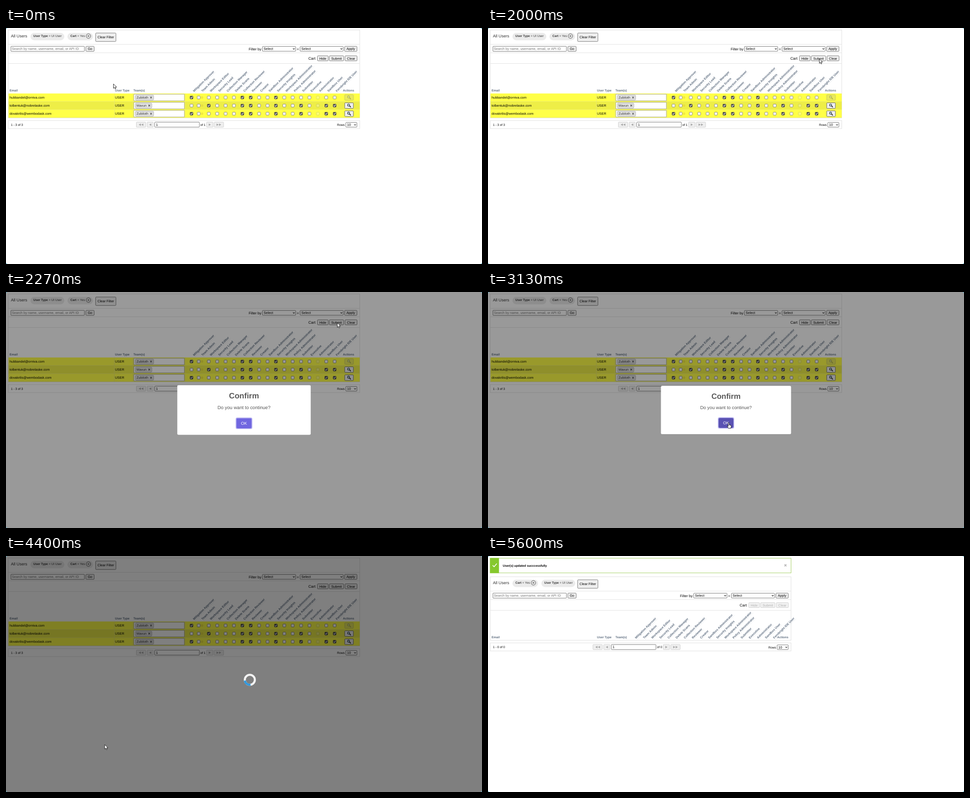
Write an HTML page that moves like this. It is 1061x528 px and loops after 7.39 s.

```html
<!DOCTYPE html>
<html lang="en">
<head>
<meta charset="utf-8">
<title>All Users</title>
<style>
  html, body { margin: 0; width: 100%; height: 100%; overflow: hidden; background: #45b3cf; }
  svg { display: block; width: 100vw; height: 100vh; }
  text { font-family: "Liberation Sans", Arial, sans-serif; text-rendering: geometricPrecision; white-space: pre; }
  .b { font-weight: bold; }
  .m { text-anchor: middle; }
  .head { font-weight: bold; fill: #5f6e80; }
</style>
</head>
<body>
<svg id="stage" viewBox="0 0 1061 528"></svg>
<script>
const LOOP = 7390, TICK = 1000 / 15;
const S = 6.8, M = 7.37, L = 7.56;   // text sizes
const stage = document.getElementById('stage');

const ROLES = ['Mitigation Approver', 'Team Admin', 'Workspace Editor', 'Security Lead', 'Collection Manager',
  'Delete Scans', 'Collection Reviewer', 'Reviewer', 'Creator', 'Sandbox Administrator', 'Security Insights',
  'Workspace Administrator', 'Policy Administrator', 'Submitter', 'Executive', 'Administrator', 'Sandbox User',
  'Fernbright IDE User'];
const USERS = [
  { email: 'hubbandel@orniva.com', team: 'Zubiloth', tag: 41, roles: [0, 6, 7, 10] },
  { email: 'tolbentuk@nobrelaske.com', team: 'Mavun', tag: 37, roles: [2, 6, 7, 10, 13, 16, 17] },
  { email: 'dovakrilis@wembodask.com', team: 'Zubiloth', tag: 41, roles: [0, 6, 7, 10, 13, 16, 17] }
];

// Drawing helpers, each returns SVG markup
const text = (x, y, s, size = L, attrs = '') => `<text x="${x}" y="${y}" font-size="${size}" ${attrs}>${s}</text>`;
const rect = (x, y, w, h, fill, stroke = 'none', r = 0, attrs = '') =>
  `<rect x="${x}" y="${y}" width="${w}" height="${h}" rx="${r}" fill="${fill}" stroke="${stroke}" ${attrs}/>`;
const path = (d, stroke, width = 1, attrs = '') =>
  `<path d="${d}" fill="none" stroke="${stroke}" stroke-width="${width}" ${attrs}/>`;
const group = (x, y, body, attrs = '') => `<g transform="translate(${x} ${y})" ${attrs}>${body}</g>`;
const cross = (x, y, r, color, width) =>
  path(`M${x - r} ${y - r}l${2 * r} ${2 * r}m0 ${-2 * r}l${-2 * r} ${2 * r}`, color, width);
const button = (x, y, w, h, label, off = false, attrs = '') =>
  rect(x, y, w, h, off ? '#f1f1f1' : '#efefef', off ? '#cfcfcf' : '#767676', 1.4, attrs) +
  text(x + w / 2, y + h / 2 + 2.7, label, L, `class="m" fill="${off ? '#b3b3b3' : '#000'}"`);
const select = (x, y, w, h, label) =>
  rect(x, y, w, h, '#fff', '#767676', 1) + text(x + 2.8, y + h / 2 + 2.6, label) +
  path(`M${x + w - 6.2} ${y + h / 2 - 1}l2 2 2-2`, '#222', 1.1);
const chip = (x, w, key, value) =>
  rect(x, 11, w, 16.5, '#ebebeb', 'none', 8.2) +
  text(x + 6.5, 20.4, `<tspan class="b">${key}</tspan> = ${value}`, S, 'fill="#333"');

const cartChip = x => chip(x, 57, 'Cart', 'Yes') +
  `<circle cx="${x + 46.7}" cy="18" r="5.1" fill="none" stroke="#444" stroke-width=".9"/>` +
  cross(x + 46.7, 18, 2, '#333', .9);
const typeChip = x => chip(x, 75.5, 'User Type', 'UI User');

function pagerButton(x, w, dir, count) {
  let arrows = '';
  for (let i = 0; i < count; i++) {
    const cx = x + w / 2 + (i - (count - 1) / 2) * 5.6;
    arrows += `<path d="M${cx + 2.4 * dir} 216.3l${-4.8 * dir} -2.6v5.2z" fill="#a8a8a8"/>`;
  }
  return rect(x, 210.5, w, 11.5, '#efefef', '#d0d0d0', 1.2) + arrows;
}

function checkbox(x, y, on, off) {
  const box = rect(x - 3.3, y - 3.3, 6.6, 6.6, on ? '#4d4d4d' : '#fff', on ? '#4d4d4d' : '#767676', 1.3,
    off ? 'opacity=".25"' : 'stroke-width=".9"');
  return box + (on ? path(`M${x - 2.2} ${y + .1}l1.6 1.7 2.9-3.7`, '#fff', 1.1) : '');
}

function userRow(user, i) {
  const y = 155.5 + 18.1 * i, off = i === 0;
  let s = rect(5.5, y - 9, 783, 18.1, i === 1 ? '#eeee47' : '#ffff47') +
    path(`M5.5 ${y + 9}H788M241.5 ${y - 9}v18M282.5 ${y - 9}v18M399.5 ${y - 9}v18`, '#e6e67a', .8) +
    text(8, y + 2.7, user.email, M) + text(243, y + 2.7, 'USER', M) +
    rect(285, y - 7.3, 112.5, 14.6, '#fff', '#aaa') +
    rect(288.5, y - 5.3, user.tag - .5, 10.8, '#e4e4e4', '#aaa', 1.6) +
    text(291, y + 2.7, user.team, M, 'fill="#333"') +
    cross(282.3 + user.tag, y, 2.1, '#555', 1.2);
  ROLES.forEach((_, c) => {
    const x = c < 2 ? 413.5 + 16 * c : 452 + 18.7 * (c - 2);
    s += checkbox(x, y, user.roles.includes(c), c === 15);
  });
  s += `<circle cx="437" cy="${y}" r="1.8" fill="none" stroke="#dcc838" stroke-width=".9"/>`;
  s += rect(755, y - 6.3, 19.3, 12.6, off ? '#eaea5c' : '#efefef', off ? '#c9c960' : '#666', 1.4);
  s += `<g opacity="${off ? .3 : 1}">` + path(`M765.6 ${y + .6}l3 3`, '#222', 1.8) +
    `<circle cx="763.6" cy="${y - 1.2}" r="2.4" fill="#b5d8ee" stroke="#333" stroke-width="1.1"/></g>`;
  return s;
}

// The user list before and after the update
function page(done) {
  const right = done ? -113 : 0, mid = done ? -56.6 : 0, down = done ? 42 : 0, width = 783.5 + right;
  const bottom = done ? 146.5 : 201;
  let s = rect(5, 4.5, width, bottom - 4.5, '#fff', '#e0e0e0') +
    path([36.5, 55.5, 79.5].map(y => `M5 ${y}h${width}`).join(''), '#e3e3e3') +
    text(11, 21, 'All Users', 9.07, 'fill="#333"') +
    (done ? cartChip(54.5) + typeChip(119) : typeChip(54.5) + cartChip(137)) +
    button(199.8, 11.2, 45.2, 19, 'Clear Filter') +
    rect(11, 41, 163.8, 11.3, '#fff', '#767676', 1) +
    text(13, 49.4, 'Search by name, username, email, or API ID', L, 'fill="#757575"') +
    button(178, 41, 18.5, 11.3, 'Go');
  s += group(right, 0,
    text(541, 49.6, 'Filter by', 7.94) + select(571.5, 41.3, 74.3, 10.7, 'Select') +
    text(648.3, 49.6, '=', 7.94) + select(655.5, 41.3, 96.3, 10.7, 'Select') +
    button(754.7, 41, 27.6, 11.3, 'Apply') + text(674, 71, 'Cart', 8.4) +
    button(694.2, 62.2, 24, 11.3, 'Hide', done) +
    button(720.7, 62.2, 32, 11.3, 'Submit', done, done ? '' : 'id="submit"') +
    button(755.7, 62.2, 26.8, 11.3, 'Clear', done));
  s += [['Email', 8], ['User Type', 243], ['Team(s)', 284], ['Actions', done ? 644.5 : 751]]
    .map(([h, x]) => text(x, 142.4, h, S, 'class="head"')).join('');
  if (!done) s += USERS.map(userRow).join('');
  const first = done ? 330.2 : 419.5, step = done ? 18.12 : 18.72;
  ROLES.forEach((role, i) => {
    s += `<g class="role" transform="translate(${first + step * i} 143.4) rotate(-45)">` +
      text(0, 0, role, S, 'class="head"') + '</g>';
  });
  const pager = rect(5, 207, width, 18, '#fff', '#e0e0e0') +
    text(11, 218.7, done ? '1 - 0 of 0' : '1 - 3 of 3', S) +
    group(mid, 0,
      pagerButton(290.5, 21, -1, 2) + pagerButton(314.5, 14, -1, 1) +
      rect(331.5, 210.6, 99.5, 11.2, '#fff', '#767676', 1) + text(334.3, 218.9, '1') +
      text(433.3, 218.7, done ? 'of 0' : 'of 1', S) +
      pagerButton(447, 14.5, 1, 1) + pagerButton(464, 21, 1, 2)) +
    group(right, 0, text(738, 219, 'Rows', S) + select(757.5, 211.3, 24.7, 10.5, '10'));
  const alert = done ? rect(5, 5, 670.5, 32.8, '#fff', '#a3cf62') + rect(4.5, 4.5, 20, 33.8, '#86c82d') +
    path('M10.3 20.8l3.3 3.2 6-7', '#fff', 1.7) +
    text(33, 24, 'User(s) updated succcessfully', S, 'class="b"') + cross(663, 20.8, 2.3, '#b5b5b5', 1.7) : '';
  return alert + group(0, down, s) + group(0, done ? -12.5 : 0, pager);
}

const shade = id => rect(0, 0, 1061, 528, '#000', 'none', 4, `id="${id}" opacity="0"`);
stage.innerHTML = rect(0, 0, 1061, 528, '#fff', 'none', 4) +
  `<g id="before">${page(false)}</g><g id="after">${page(true)}</g>` + shade('dim') + shade('veil') +
  group(543.5, 277, '<circle r="11.2" fill="none" stroke="#f3f3f3" stroke-width="4.6"/>' +
    '<circle id="arc" r="11.2" fill="none" stroke="#3498db" stroke-width="4.6" pathLength="4" stroke-dasharray="1 3"/>',
    'id="spinner"') +
  '<g id="dialog">' + group(-530.5, -264,
    rect(385.5, 210, 290, 108, '#fff', 'none', 2.8) +
    text(530.5, 239, 'Confirm', 17, 'class="b m" fill="#595959"') +
    text(530.5, 262.4, 'Do you want to continue?', 10.2, 'class="m" fill="#545454"') +
    rect(513.2, 281.1, 34.6, 23.6, 'none', '#b7b2ef', 3, 'stroke-width="1.7"') +
    rect(514, 282, 33, 21.9, '#7066e0', 'none', 2.3, 'id="ok"') +
    text(530.5, 296, 'OK', 9.07, 'class="m" fill="#fff"')) + '</g>' +
  '<g id="cursor" fill="#fff" stroke="#111" stroke-width=".9" stroke-linejoin="round">' +
  '<path id="arrow" d="M0 0V10l2.3-2.1 1.6 3.6 1.7-.8-1.6-3.4h3.2z"/>' +
  '<path id="hand" d="M-1 1a1.1 1.1 0 0 1 2.2 0V5l3.4.7q1.3.4 1 1.8l-.7 4.9H-.4L-3.2 8.5q-.2-1.6 1.1-1.1L-1 8.2z"/></g>';

const el = Object.fromEntries([...stage.querySelectorAll('[id]')].map(e => [e.id, e]));
for (const g of stage.querySelectorAll('.role')) {
  const w = g.firstChild.getComputedTextLength();
  g.insertAdjacentHTML('beforeend', path(`M0 2.3H${w + 2}`, '#cfd3d8', .6, 'stroke-dasharray="1 .7"'));
}

const clamp = v => Math.min(1, Math.max(0, v));
const mix = (a, b, p) => a + (b - a) * p;

// CSS "ease": cubic-bezier(.25, .1, .25, 1)
function ease(x) {
  const curve = (a, b, u) => 3 * a * u * (1 - u) ** 2 + 3 * b * u * u * (1 - u) + u ** 3;
  let lo = 0, hi = 1;
  for (let i = 0; i < 20; i++) {
    const u = (lo + hi) / 2;
    if (curve(.25, .25, u) < x) lo = u; else hi = u;
  }
  return x <= 0 ? 0 : x >= 1 ? 1 : curve(.1, 1, lo);
}

// Pointer path: time, x, y
const PATH = [[0, 239.5, 125], [130, 250, 127], [330, 360, 130], [570, 590, 115], [800, 725, 78], [930, 737, 70.5],
  [1066, 738.5, 69], [2400, 738.5, 69], [2650, 650, 160], [2930, 541, 286], [3066, 536.5, 292.5],
  [3530, 536.5, 292.5], [3930, 380, 362], [4333, 220, 422], [4410, 220, 422], [4800, 165, 485],
  [5130, 126, 524], [5270, 112, 545]];

// Monotone cubic through the path points
function along(t, axis) {
  const last = PATH.length - 1;
  if (t >= PATH[last][0]) return PATH[last][axis];
  const i = PATH.findIndex(p => p[0] > t) - 1;
  const slope = k => k < 0 || k >= last ? 0 : (PATH[k + 1][axis] - PATH[k][axis]) / (PATH[k + 1][0] - PATH[k][0]);
  const tangent = k => {
    const a = slope(k - 1), b = slope(k);
    return a * b > 0 ? 2 * a * b / (a + b) : 0;
  };
  const a = PATH[i], b = PATH[i + 1], span = b[0] - a[0], u = (t - a[0]) / span;
  return mix(a[axis], b[axis], u * u * (3 - 2 * u)) +
    span * (tangent(i) * u * (1 - u) ** 2 - tangent(i + 1) * u * u * (1 - u));
}

function popScale(p) {
  if (p < .45) return mix(.7, 1.05, ease(p / .45));
  if (p < .8) return mix(1.05, .95, ease((p - .45) / .35));
  return mix(.95, 1, ease((p - .8) / .2));
}

const show = (e, on) => e.style.display = on ? '' : 'none';
const OPEN = 2113, CLOSE = 3184, LOAD = 3230, DONE = 5590;

function draw(t) {
  const done = t >= DONE, x = along(t, 1), y = along(t, 2);
  show(el.before, !done);
  show(el.after, done);

  const pressed = t >= 1990 && t < 2090, hover = t >= 860 && t < 2090;
  el.submit.setAttribute('fill', pressed ? '#f5f5f5' : hover ? '#e2e2e2' : '#efefef');
  el.submit.setAttribute('stroke', hover && !pressed ? '#4a4a4a' : '#767676');

  el.dim.setAttribute('opacity', .4 * (ease((t - 2095) / 100) - ease((t - CLOSE) / 100)));
  const loading = t >= LOAD && !done;
  el.veil.setAttribute('opacity', loading ? .5 : 0);
  show(el.spinner, loading);
  el.arc.setAttribute('transform', `rotate(${13 + (t - 3267) * .18 - 135})`);

  const out = ease((t - CLOSE) / 150);
  show(el.dialog, t >= OPEN && out < 1);
  const scale = t < CLOSE ? popScale(clamp((t - OPEN) / 300)) : 1 - out / 2;
  el.dialog.setAttribute('transform', `translate(530.5 264) scale(${scale})`);
  el.dialog.setAttribute('opacity', 1 - out);

  const onOk = t > OPEN && t < LOAD && x > 514 && x < 547 && y > 282 && y < 304;
  el.ok.setAttribute('fill', !onOk ? '#7066e0' : t > 3110 && t < CLOSE ? '#5a52b3' : '#655cca');
  show(el.arrow, !onOk);
  show(el.hand, onOk);
  el.cursor.setAttribute('transform', `translate(${x} ${y})`);
}

const start = performance.now();
function frame() {
  const t = (performance.now() - start) % LOOP;
  draw(Math.floor((t + 3.4) / TICK) * TICK);
  requestAnimationFrame(frame);
}
frame();
</script>
</body>
</html>
```
